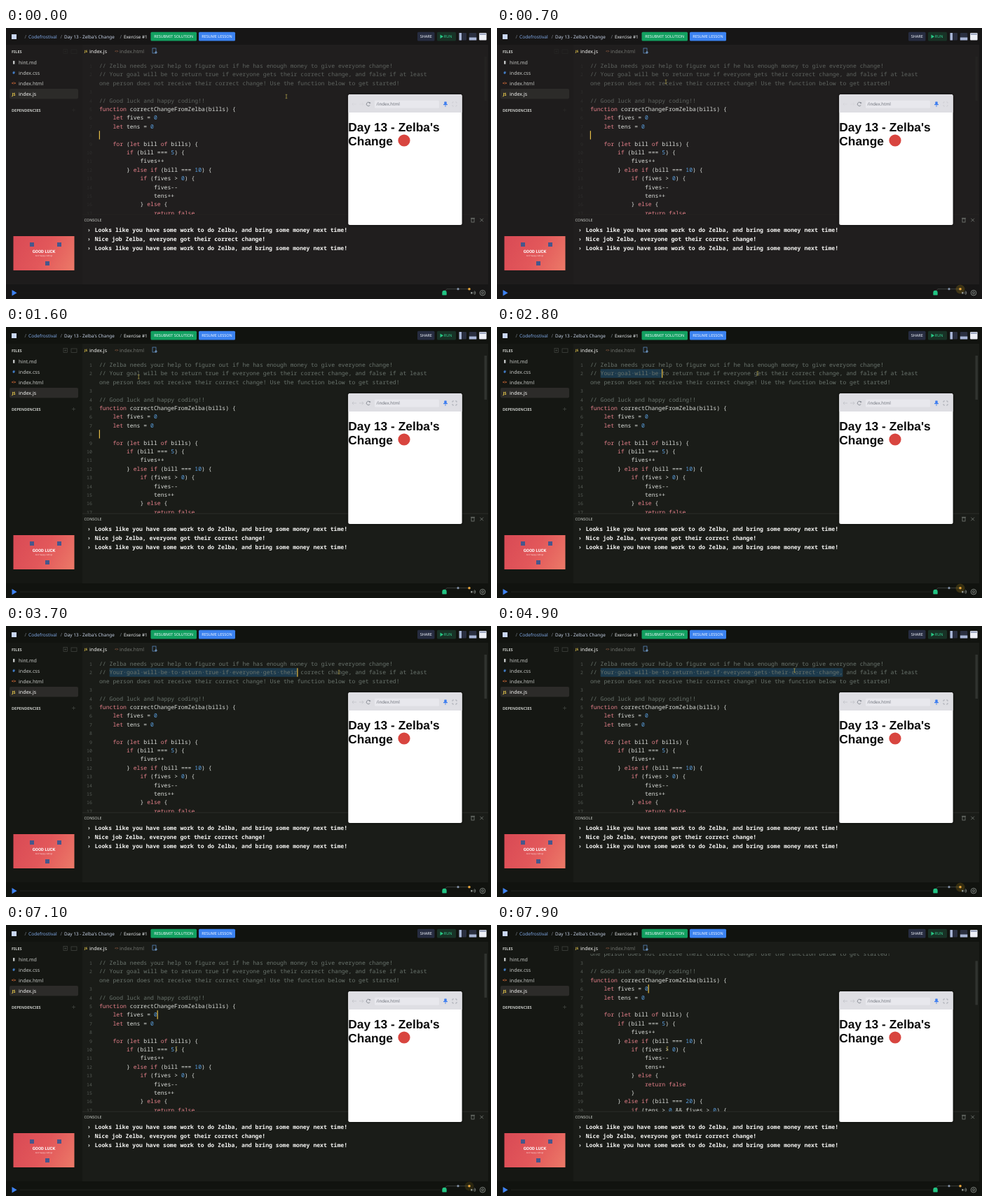
Animation of 692 by 388 pixels, one loop 8000 ms. Source, as an HTML page with a canvas:

```html
<!DOCTYPE html>
<html lang="en">
<head>
<meta charset="utf-8">
<title>Coding lesson</title>
<style>
html, body { margin: 0; width: 692px; height: 388px; overflow: hidden; background: #11130f; }
canvas { display: block; width: 692px; height: 388px; }
</style>
</head>
<body>
<canvas id="stage"></canvas>
<script>
const W = 692, H = 388, LOOP = 8000;
const canvas = document.getElementById('stage');
const c = canvas.getContext('2d');
const dpr = window.devicePixelRatio || 1;
canvas.width = W * dpr;
canvas.height = H * dpr;
c.scale(dpr, dpr);
c.textRendering = 'geometricPrecision';

const SANS = '"Noto Sans", sans-serif';
const MONO = '"Noto Sans Mono", monospace';
const HEADING = '"Liberation Sans", Arial, sans-serif';
const COL = 4.87, ROW = 12.41, CODE_X = 133, CODE_Y = 54;
const HERO = 'Zelba';

const WARM = { page: '#171616', side: '#1e1c1c', editor: '#201e1e', comment: '#5e635f', fine: 0.25 };
const COOL = { page: '#11130f', side: '#151713', editor: '#1a1c18', comment: '#69736c', fine: 1 };
let look = COOL;

const CODE = `// ${HERO} needs your help to figure out if he has enough money to give everyone change!
// Your goal will be to return true if everyone gets their correct change, and false if at least
one person does not receive their correct change! Use the function below to get started!

// Good luck and happy coding!!
function correctChangeFrom${HERO}(bills) {
    let fives = 0
    let tens = 0

    for (let bill of bills) {
        if (bill === 5) {
            fives++
        } else if (bill === 10) {
            if (fives > 0) {
                fives--
                tens++
            } else {
                return false
            }
        } else if (bill === 20) {
            if (tens > 0 && fives > 0) {`.split('\n');

const WORK = `Looks like you have some work to do ${HERO}, and bring some money next time!`;
const LOGS = [WORK, `Nice job ${HERO}, everyone got their correct change!`, WORK];

const linear = k => k;
const easeOut = k => 1 - (1 - k) ** 4;

const POINTER = [
  { from: 0, to: 700, at: [241, 77] },
  { from: 700, to: 2300, at: [149, 67] },
  { from: 2500, to: 3700, at: [475, 66], ease: easeOut },
  { from: 4200, to: 5100, at: [410, 63] },
  { from: 5400, to: 6100, at: [420, 126] },
  { from: 6500, to: 6600, at: [217, 128] },
  { from: 6800, to: 7100, at: [243, 177] }
];
const SELECTION = [
  { from: 2500, to: 2800, at: [21] },
  { from: 2800, to: 3700, at: [58] },
  { from: 3700, to: 3900, at: [74] }
];

function travel(pos, moves, t) {
  for (const { from, to, at, ease = linear } of moves) {
    if (t <= from) break;
    const k = ease(Math.min(1, (t - from) / (to - from)));
    pos = pos.map((v, i) => v + (at[i] - v) * k);
  }
  return pos;
}

function box(x, y, w, h, fill, r = 0) {
  c.fillStyle = fill;
  c.beginPath();
  c.roundRect(x, y, w, h, r);
  c.fill();
}

function outline(x, y, w, h, color) {
  c.strokeStyle = color;
  c.lineWidth = 0.7;
  c.strokeRect(x, y, w, h);
}

function line(color, x1, y1, x2, y2, width = 0.7) {
  c.strokeStyle = color;
  c.lineWidth = width;
  c.beginPath();
  c.moveTo(x1, y1);
  c.lineTo(x2, y2);
  c.stroke();
}

function arc(x, y, r, color, a = 0, b = Math.PI * 2) {
  c.strokeStyle = color;
  c.lineWidth = 0.8;
  c.beginPath();
  c.arc(x, y, r, a, b);
  c.stroke();
}

function disc(x, y, r, fill) {
  c.fillStyle = fill;
  c.beginPath();
  c.arc(x, y, r, 0, Math.PI * 2);
  c.fill();
}

function triangle(x, y, r, fill) {
  c.fillStyle = fill;
  c.beginPath();
  c.moveTo(x, y - r);
  c.lineTo(x + r * 1.7, y);
  c.lineTo(x, y + r);
  c.fill();
}

function plus(x, y, r, color) {
  line(color, x - r, y, x + r, y);
  line(color, x, y - r, x, y + r);
}

function cross(x, y, r, color) {
  line(color, x - r, y - r, x + r, y + r);
  line(color, x - r, y + r, x + r, y - r);
}

function arrow(x, y, dir, color) {
  line(color, x - 3 * dir, y, x + 3 * dir, y);
  for (const s of [-1, 1]) line(color, x + 3 * dir, y, x + dir, y + 2.2 * s);
}

function text(s, x, y, size, color, weight = 400, family = SANS, align = 'left') {
  c.font = `${weight} ${size}px ${family}`;
  c.fillStyle = color;
  c.textAlign = align;
  c.fillText(s, x, y);
}

// Sets tokens on the character grid.
function grid(s, x, y, pattern, color, weight = 400) {
  for (const m of s.matchAll(pattern)) text(m[0], x + m.index * COL, y, 8.12, color(m[0]), weight, MONO);
}

function faint(draw) {
  c.save();
  c.globalAlpha = look.fine;
  draw();
  c.restore();
}

function button(label, x, w, fill, color = '#f4f8ff') {
  box(x, 5.8, w, 12.8, fill, 1.5);
  text(label, x + w / 2, 14.3, 5.5, color, 500, SANS, 'center');
}

function header() {
  box(8, 9, 7, 7, '#c9d6f3');
  for (const x of [26.5, 77.5, 162.5]) text('/', x, 14.5, 7, '#777c83');
  text('Codefrostival', 32, 14.5, 6.6, '#7fa8e6');
  text(`Day 13 - ${HERO}'s Change`, 83, 14.5, 6.45, '#c9d5ea');
  text('Exercise #1', 168, 14.5, 6.4, '#eef1f4');
  button('RESUBMIT SOLUTION', 206.5, 65.5, '#12a060');
  button('RESUME LESSON', 275, 52, '#3b82f0');
  button('SHARE', 587, 24.5, '#262c40');
  button('   RUN', 615, 27, '#183226', '#35d293');
  triangle(619.5, 12.3, 2.7, '#27c985');
  for (let i = 0; i < 3; i++) box(646.5 + i * 14.3, 7, 10.5, 10.5, i < 2 ? '#2a2f40' : '#eef0f6', 1);
  box(646.5, 7, 3.5, 10.5, '#a9b6d6');
  box(660.8, 13.5, 10.5, 4, '#a9b6d6');
  box(675.8, 7.8, 9, 1.8, '#8b96b4');
}

function sidebar() {
  text('FILES', 8, 36, 5.6, '#c8cac6', 600);
  text('DEPENDENCIES', 8, 120, 5.5, '#c8cac6', 600);
  faint(() => {
    outline(82, 30.5, 5.5, 6, '#454844');
    outline(93, 31, 8, 5.5, '#454844');
    plus(84.8, 33.5, 1.5, '#454844');
    plus(96.5, 117.5, 2.5, '#454844');
  });
  box(5, 87, 98, 14.5, '#2c2b29', 2);
  const files = [
    ['▮', '#c6c8c8', 'hint.md'], ['#', '#4b91e8', 'index.css'],
    ['<>', '#e6743c', 'index.html'], ['JS', '#e8c94c', 'index.js']
  ];
  files.forEach(([icon, color, name], i) => {
    const y = 51.5 + i * 15.1;
    text(icon, 11, y - 0.3, 5.8, color, 700, SANS, 'center');
    text(name, 18, y, 7.05, i === 3 ? '#f5f5f3' : '#c5c7c4', i === 3 ? 500 : 400);
  });
}

function slide() {
  const g = c.createLinearGradient(11, 298, 98, 347);
  g.addColorStop(0, '#d94a55');
  g.addColorStop(0.5, '#e2575a');
  g.addColorStop(1, '#ec7a68');
  box(10.5, 298, 87, 49, g);
  for (const [x, y] of [[37, 310], [76, 310], [59, 337]]) box(x - 3, y - 3, 6, 6, '#47578c');
  text('GOOD LUCK', 54, 322.3, 6, '#fff', 700, '"Liberation Sans Narrow", Roboto, sans-serif', 'center');
  text('And happy coding!', 54, 327.3, 2.8, '#fde4e2', 500, SANS, 'center');
}

function tabs() {
  text('JS', 112, 35.2, 4.6, '#e8c94c', 700);
  text('index.js', 119, 35.6, 7, '#f5f5f3', 500);
  text('<>', 155, 35.2, 5, '#87563f', 700);
  text('index.html', 162, 35.6, 7, '#71746f');
  outline(209, 29, 5, 7, '#5e93cf');
  plus(214, 35, 2, '#8dbbee');
}

const KEYWORD = /^(function|let|for|of|if|else|return|false)$/;

function codeColor(token) {
  if (KEYWORD.test(token)) return '#e5808a';
  return /^\d/.test(token) ? '#5a9fe0' : '#dcdfdb';
}

function caretAt(t, end) {
  if (t < 2400) return [0, 8];
  if (t < 3900) return [end, 1];
  return t < 6700 ? null : [17, 6];
}

function editor(t) {
  const scroll = 1.5 * ROW * Math.min(2, Math.max(0, t / 100 - 77));
  const top = row => CODE_Y + row * ROW - 6.1;
  const end = Math.round(travel([3], SELECTION, t)[0]);
  const picked = t >= 2500 && t < 6600;
  c.save();
  c.beginPath();
  c.rect(109, 41, 579, 226);
  c.clip();
  c.translate(0, -scroll);
  if (picked) box(CODE_X + 3 * COL, top(1), (end - 3) * COL, ROW, '#1d3a4c', 1);

  CODE.forEach((s, i) => {
    const y = CODE_Y + i * ROW + 2.9;
    if (/^(\/\/|one )/.test(s)) grid(s, CODE_X, y, /\S+/g, () => look.comment);
    else grid(s, CODE_X, y, /\w+|[^\w\s]+/g, codeColor);
    if (i !== 2) faint(() => text(i < 2 ? i + 1 : i, 122.8, y, 6.5, '#565b56', 400, MONO, 'right'));
  });
  if (picked) grid(CODE[1].slice(3, end).replace(/\S/g, ' ').replace(/ /g, (_, i) => CODE[1][i + 3] === ' ' ? '·' : ' '),
    CODE_X + 3 * COL, CODE_Y + ROW + 2.9, /·/g, () => '#617681');

  const caret = caretAt(t, end);
  if (caret) box(CODE_X + caret[0] * COL - 0.2, top(caret[1]), 1.2, ROW, '#e6bd48');
  c.restore();
  faint(() => box(682.5, 41 + scroll * 0.28, 3.5, 63, '#30332f'));
}

function consolePane() {
  faint(() => box(109, 266.7, 579, 0.7, '#30332f'));
  text('CONSOLE', 111.5, 277.2, 5.5, '#cdd0cb', 500);
  outline(664, 273, 4, 5, '#858a84');
  line('#858a84', 663, 272.3, 669, 272.3);
  cross(678.7, 275, 2.3, '#858a84');
  LOGS.forEach((s, i) => {
    const y = 291.9 + i * 13;
    text('›', 116, y, 8.12, '#d5d7d4', 600, MONO);
    grid(s, 126.7, y, /\S+/g, () => '#f5f5f3', 600);
  });
}

function preview() {
  c.save();
  c.shadowColor = 'rgba(0,0,0,.5)';
  c.shadowBlur = 5;
  box(488.3, 95, 162.3, 187, '#fff', 2.5);
  c.restore();
  box(488.3, 95, 162.3, 26, '#dedee3', [2.5, 2.5, 0, 0]);
  box(526, 103.7, 92, 11, '#e8e8ed', 1.5);
  faint(() => {
    arrow(497, 109, -1, '#bcbec4');
    arrow(507, 109, 1, '#bcbec4');
    for (const sx of [-1, 1]) for (const sy of [-1, 1]) {
      const x = 640 + 3 * sx, y = 109 + 3 * sy;
      line('#9b9ea6', x, y, x - 2 * sx, y);
      line('#9b9ea6', x, y, x, y - 2 * sy);
    }
  });
  arc(517, 109, 2.7, '#777b84', 0.5, 5.6);
  triangle(518.4, 107.3, 1.3, '#777b84');
  text('/index.html', 528.5, 111.3, 6.2, '#6d717a');
  box(625.3, 105.5, 3.4, 4, '#3c7df0', 0.6);
  box(624, 109, 6, 1.2, '#3c7df0');
  box(626.6, 110, 0.8, 3, '#3c7df0');
  text(`Day 13 - ${HERO}'s`, 488.3, 148, 17.35, '#0a0a0a', 700, HEADING);
  text('Change', 488.3, 167.5, 17.35, '#0a0a0a', 700, HEADING);
  disc(568, 161, 8.6, '#d8453f');
}

function player(t) {
  faint(() => box(20, 378.8, 600, 0.8, '#272a26'));
  triangle(8.5, 379.2, 4.2, '#3f83f2');

  line('#4b514c', 625.5, 377, 629, 373.7);
  line('#4b514c', 629, 373.7, 661, 373.7);
  const pulse = (t - 400 + 2080) % 2080;
  if (pulse < 500) disc(661, 374, 3.5 + 3 * Math.min(1, pulse / 300), `rgba(190,150,25,${0.42 * (1 - pulse / 700)})`);
  box(622.3, 375.8, 6.4, 6.6, '#22c483', [3.2, 3.2, 0.6, 0.6]);
  disc(645, 373.7, 1.6, '#8392a8');
  disc(661, 373.7, 1.8, '#eba83c');

  box(663.3, 378, 2.2, 2.6, '#9aa09b');
  for (const r of [2, 3.7]) arc(666, 379.2, r, '#9aa09b', -0.8, 0.8);
  for (const r of [1.5, 3.8]) arc(680, 379.2, r, '#9aa09b');
}

function pointer(t) {
  const [x, y] = travel([400, 98], POINTER, t);
  line('#a89a48', x, y - 2.7, x, y + 2.7, 0.8);
  for (const s of [-2.7, 2.7]) line('#a89a48', x - 1.3, y + s, x + 1.3, y + s);
}

function draw(now) {
  const t = Math.floor((now % LOOP) / 100) * 100;
  look = t < 1000 ? WARM : COOL;
  box(0, 0, W, H, look.page);
  box(0, 24, 109, 343, look.side);
  box(109, 24, 579, 343, look.editor);
  header();
  sidebar();
  slide();
  tabs();
  editor(t);
  consolePane();
  preview();
  player(t);
  pointer(t);
}

const start = performance.now();
function tick() {
  draw(performance.now() - start);
  requestAnimationFrame(tick);
}
tick();
</script>
</body>
</html>
```
